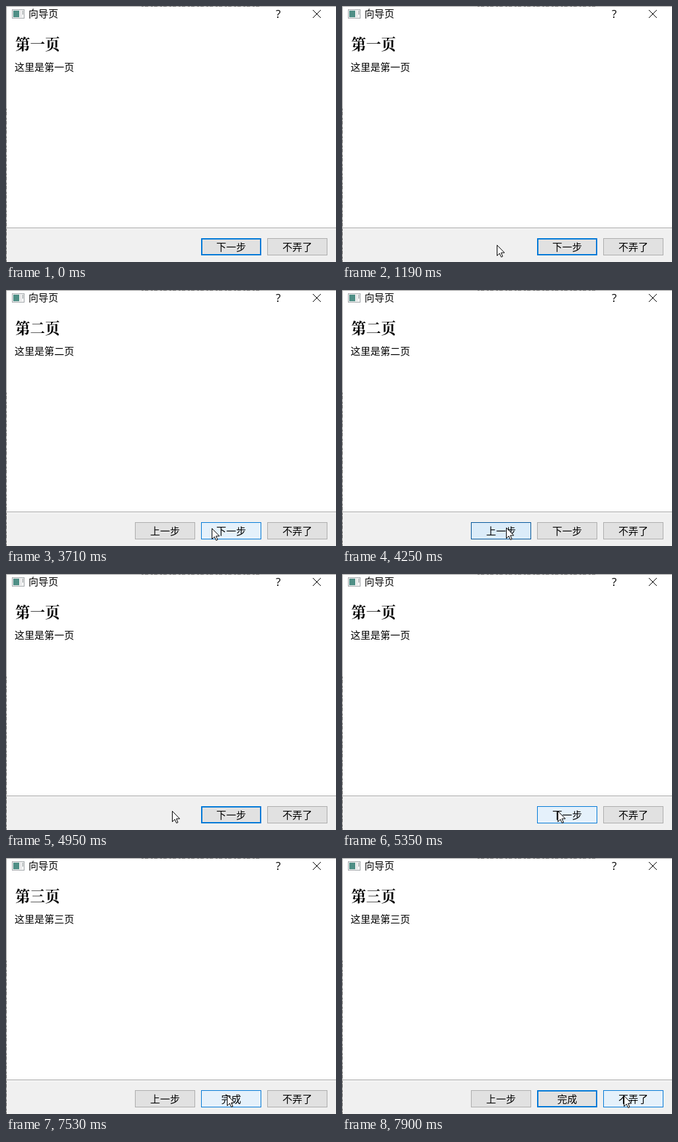
An HTML page that plays this animation: 499 by 387 pixels, repeating every 8 s.

```html
<!DOCTYPE html>
<html lang="zh-CN">
<head>
<meta charset="utf-8">
<title>向导页</title>
<style>
  :root {
    --plain: inset 0 0 0 1px #adadad;
    --default: inset 0 0 0 2px #0078d7;
    --hover: inset 0 0 0 1px #0078d7;
    --press: inset 0 0 0 1px #005499;
  }
  html, body { margin: 0; width: 100%; height: 100%; overflow: hidden; }
  body {
    position: relative;
    background: #fff;
    color: #000;
    font: 350 15px/20px "Noto Sans CJK SC", "Noto Sans CJK", sans-serif;
    white-space: nowrap;
  }
  body > *, section > *, .button > * { position: absolute; }
  svg { left: 0; top: 0; overflow: visible; }

  .caption { left: 34px; top: 1px; font-weight: 400; }
  .help { left: 408px; top: 1px; font: 17px/22px "Open Sans", sans-serif; }
  h1 {
    left: 14px; top: 44px; margin: 0;
    font: 700 22.5px/24px "Noto Serif CJK SC", "Noto Sans CJK SC", "Noto Sans CJK", serif;
  }
  p { left: 13px; top: 82px; margin: 0; }
  footer {
    left: 1px; right: 0; top: 335px; bottom: 0;
    background: #f0f0f0;
    box-shadow: inset 0 1px #a0a0a0, inset 0 2px #fff;
  }
  .button {
    top: 351px; width: 91px; height: 26px;
    line-height: 25px; text-align: center;
    background: #e1e1e1;
    box-shadow: var(--plain);
  }
  .button span { left: 0; width: 100%; }
  .back { left: 195px; }
  .next { left: 295px; }
  .cancel { left: 395px; }

  /* Every track holds its value unless a keyframe asks for motion. */
  .one, .two, .three, .onward, .back, .next, .cancel, .cursor {
    animation: 8s step-end infinite;
  }
  .one { animation-name: one; }
  .two { animation-name: two; }
  .three { animation-name: three; }
  .onward { animation-name: onward; }
  .back { animation-name: backShown, backState; }
  .next { animation-name: nextState; }
  .cancel { animation-name: cancelState; }
  .cursor { animation-name: move; transform: translate(237px, 400px); }

  @keyframes one {
    0%, 55.4% { visibility: visible; }
    33.4%, 72.75%, 100% { visibility: hidden; }
  }
  @keyframes two {
    0%, 55.4%, 81%, 100% { visibility: hidden; }
    33.4%, 72.75% { visibility: visible; }
  }
  @keyframes three {
    0% { visibility: hidden; }
    81%, 100% { visibility: visible; }
  }
  @keyframes onward {
    0% { visibility: visible; }
    81%, 100% { visibility: hidden; }
  }
  @keyframes backShown {
    0%, 55.4% { visibility: hidden; }
    33.4%, 72.75%, 100% { visibility: visible; }
  }

  @keyframes backState {
    0%, 56.2%, 100% { background: #e1e1e1; box-shadow: var(--plain); }
    48.3% { background: #e1e1e1; box-shadow: var(--plain); animation-timing-function: linear; }
    50% { background: #e5f1fb; box-shadow: var(--hover); }
    53.125% { background: #dbecf9; box-shadow: var(--press); animation-timing-function: linear; }
    54.5% { background: #cce4f7; box-shadow: var(--press); }
  }
  @keyframes nextState {
    0%, 50%, 56.125%, 98.75%, 100% { background: #e1e1e1; box-shadow: var(--default); }
    22.8%, 64.2% { background: #e1e1e1; box-shadow: var(--default); animation-timing-function: linear; }
    26.125%, 34.875%, 66.875%, 75.125%, 82% { background: #e5f1fb; box-shadow: var(--hover); }
    31.125%, 70.125%, 79.75% { background: #dbecf9; box-shadow: var(--hover); animation-timing-function: linear; }
    32.8%, 72%, 80.8% { background: #cce4f7; box-shadow: var(--press); animation-timing-function: linear; }
    47.8%, 96.2% { background: #e5f1fb; box-shadow: var(--hover); animation-timing-function: linear; }
    53.125% { background: #e1e1e1; box-shadow: var(--plain); }
    55.4% { background: #e1e1e1; box-shadow: var(--plain); animation-timing-function: linear; }
  }
  @keyframes cancelState {
    0% { background: #e1e1e1; box-shadow: var(--plain); }
    96.6% { background: #e1e1e1; box-shadow: var(--plain); animation-timing-function: linear; }
    98.75%, 100% { background: #e5f1fb; box-shadow: var(--hover); }
  }

  @keyframes move {
    0% { transform: translate(237px, 400px); }
    11.625% { transform: translate(237px, 382px); animation-timing-function: steps(5); }
    14.875% { transform: translate(234px, 361px); }
    20.25% { transform: translate(240px, 361px); animation-timing-function: steps(6); }
    24.65% { transform: translate(321px, 359px); }
    46.375% { transform: translate(311px, 360px); animation-timing-function: steps(5); }
    50% { transform: translate(248px, 359px); }
    61.875% { transform: translate(251px, 358px); animation-timing-function: steps(3); }
    63.75% { transform: translate(287px, 358px); animation-timing-function: steps(4); }
    66.25% { transform: translate(326px, 358px); }
    94.125% { transform: translate(334px, 358px); animation-timing-function: steps(5); }
    97.45%, 100% { transform: translate(426px, 359px); }
  }
</style>
</head>
<body>
  <div class="caption">向导页</div>
  <div class="help">?</div>

  <section class="one"><h1>第一页</h1><p>这里是第一页</p></section>
  <section class="two"><h1>第二页</h1><p>这里是第二页</p></section>
  <section class="three"><h1>第三页</h1><p>这里是第三页</p></section>

  <footer></footer>
  <div class="button back">上一步</div>
  <div class="button next">
    <span class="onward">下一步</span>
    <span class="three">完成</span>
  </div>
  <div class="button cancel">不弄了</div>

  <svg width="499" height="387" fill="none">
    <path d="M0 .5H499M.5 0V387" stroke="#a0a0a0"/>
    <path d="M205 .5H385M.5 155V387" stroke="#606060" stroke-dasharray="3 2 5 4"/>
    <rect x="9.5" y="5.5" width="18" height="13" fill="#f4f4f4" stroke="#a3a8ab"/>
    <rect x="11" y="7" width="9" height="10" fill="#4f8f86"/>
    <path d="M22.5 7V17" stroke="#d4d8da"/>
    <path d="M25.5 7V13" stroke="#8e9699"/>
    <path d="M464 6L476 18M476 6L464 18" stroke="#000"/>
    <path class="cursor" d="M.5 .5V16.5L4.2 13L6.8 18.5L9 17.5L6.6 12H11.7Z" fill="#fff" stroke="#000"/>
  </svg>
</body>
</html>
```
